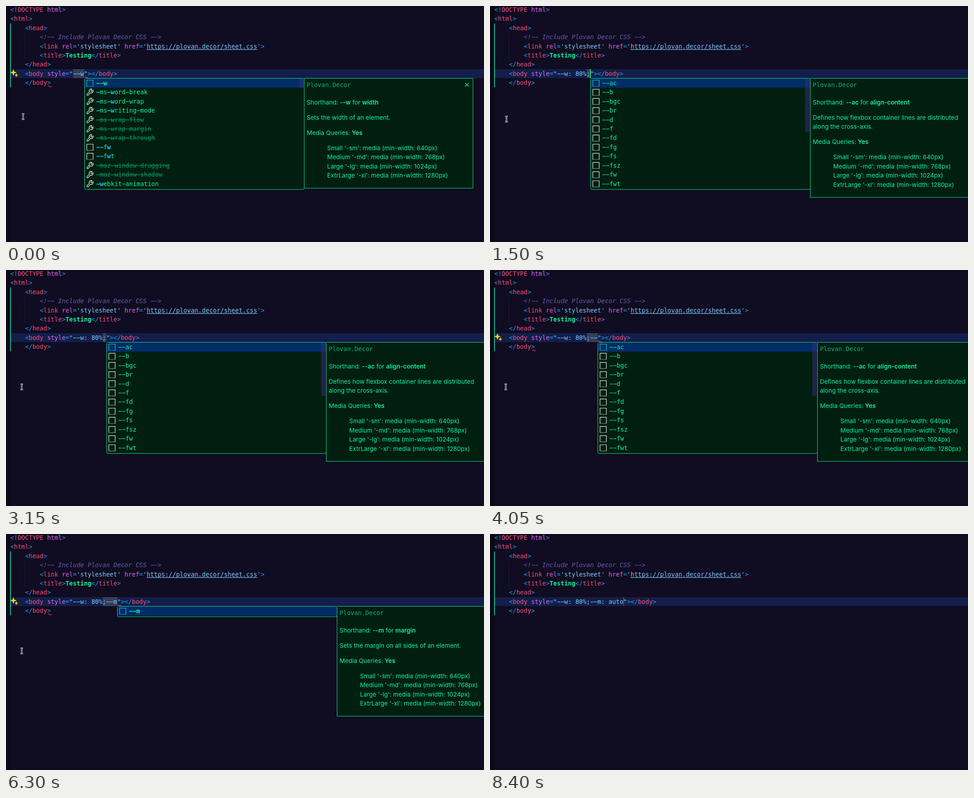
These frames come from a looping animation (1062 px wide and 527 px high, 8.55 s). An HTML page with a canvas:

```html
<!DOCTYPE html>
<html lang="en">
<head>
<meta charset="utf-8">
<title>Editor completion demo</title>
<style>
  html, body { margin: 0; width: 100%; height: 100%; overflow: hidden; background: #100c21; }
  canvas { display: block; }
</style>
</head>
<body>
<canvas id="stage" width="1062" height="527"></canvas>
<script>
const ctx = document.getElementById('stage').getContext('2d');
const LOOP = 8550, STEP = 150, CHAR = 8.188, ROW = 20.43;
const MONO = '13.6px "DejaVu Sans Mono", monospace';
const SANS = '13.5px Inter, sans-serif';
const BLUE = '#12a5ef', PINK = '#ff4f7b', VIOLET = '#e366f2', SKY = '#7fcbff',
      GREEN = '#12f59f', EDGE = '#0fe092', PANEL = '#011f11', DIM = '#0a9562', RED = '#e8365a';
const BRAND = ['Plovan', 'Decor'];

// [start, attribute value, menu, sparkle, problem marks]
const steps = [
  [0, '--w', 'width', 1, 1],
  [150, '--w: 8', '', 1, 0],
  [300, '--w: 80%', '', 1, 0],
  [450, '--w: 80%', '', 0, 0],
  [1350, '--w: 80%;', '', 0, 0],
  [1500, '--w: 80%;', 'all', 0, 0],
  [3450, '--w: 80%;-', 'all', 0, 0],
  [3600, '--w: 80%;--', 'all', 1, 1],
  [4800, '--w: 80%;--m', 'margin', 1, 1],
  [6750, '--w: 80%;--m: auto', '', 1, 0],
  [7050, '--w: 80%;--m: auto', '', 0, 0],
  [8550]
];

// [time, caret opacity]
const blink = [[0, 0], [150, 1], [600, 0], [900, .5], [1050, 1], [1950, 0], [2400, 1], [2850, 0],
  [3450, 1], [4050, 0], [4500, 1], [5250, 0], [5700, 1], [6300, 0], [6750, 1], [7200, 0],
  [7650, 1], [8400, .4]];

// [time, x, y]
const pointer = [[0, 38, 247], [300, 37.3, 249], [1050, 37, 251], [1350, 37, 251], [1650, 36.3, 254],
  [2250, 35.5, 257], [3150, 35, 261], [7800, 35, 261], [8250, 1013, 516]];

const menus = {
  width: {
    items: ['--w', '-ms-word-break', '-ms-word-wrap', '-ms-writing-mode', '!-ms-wrap-flow',
      '!-ms-wrap-margin', '!-ms-wrap-through', '--fw', '--fwt', '!-moz-window-dragging',
      '!-moz-window-shadow', '-webkit-animation'],
    thumb: 21, key: '--w', text: ['Sets the width of an element.']
  },
  all: {
    items: 'ac b bgc br d f fd fg fs fsz fw fwt'.split(' ').map(s => '--' + s),
    thumb: 119, key: '--ac', name: 'align-content',
    text: ['Defines how flexbox container lines are distributed', 'along the cross-axis.']
  },
  margin: {
    items: ['--m'], thumb: 0, key: '--m',
    text: ['Sets the margin on all sides of an element.']
  }
};
const sizes = [['Small', 'sm', 640], ['Medium', 'md', 768], ['Large', 'lg', 1024], ['ExtrLarge', 'xl', 1280]];

const wrench = new Path2D('M2.1 14.9a1.8 1.8 0 0 1 0-2.6L7.4 7.2A4.3 4.3 0 0 1 13 1.2L10.4 3.8 10.9 5.7 12.8 6.1 15.2 3.6A4.3 4.3 0 0 1 9.4 9.3L4.7 14.9a1.8 1.8 0 0 1-2.6 0Z');
const beam = new Path2D('M-3-6.2Q0-6.2 0-3.8Q0-6.2 3-6.2M0-3.8V3.8M-3 6.2Q0 6.2 0 3.8Q0 6.2 3 6.2M-1.8 1.2H1.8');

const rowY = i => 8 + ROW * i;
const at = (list, t) => list.filter(e => e[0] <= t).pop();

function rect(x, y, w, h, color) {
  ctx.fillStyle = color;
  ctx.fillRect(x, y, w, h);
}

function line(color, width, ...points) {
  ctx.strokeStyle = color;
  ctx.lineWidth = width;
  ctx.beginPath();
  points.forEach(([x, y]) => ctx.lineTo(x, y));
  ctx.stroke();
}

// Monospaced text centred on y, with the editor's long dashes
function mono(text, x, y, color, style = '') {
  ctx.font = style + ' ' + MONO;
  ctx.fillStyle = color;
  [...text.replace(/-/g, '\u2212')].forEach((c, i) => ctx.fillText(c, x + i * CHAR, y + 4.8));
  return x + text.length * CHAR;
}

function code(row, indent, ...parts) {
  let x = 9.5 + indent * 4 * CHAR;
  for (let i = 0; i < parts.length; i += 2) x = mono(parts[i + 1], x, rowY(row), parts[i]);
}

// Proportional text; odd pieces are bold
function prose(x, y, ...parts) {
  ctx.fillStyle = GREEN;
  parts.forEach((s, i) => {
    ctx.font = (i % 2 ? '600 ' : '') + SANS;
    ctx.fillText(s, x, y + 4.8);
    x += ctx.measureText(s).width;
  });
}

function squiggle(x, y) {
  line(RED, 1.2, [x, y + 1], [x + 2, y - 1], [x + 5, y + 2], [x + 8, y]);
}

function star(x, y, r) {
  ctx.fillStyle = '#ffd20a';
  ctx.beginPath();
  for (let i = 0; i < 8; i++) {
    const a = i * Math.PI / 4, d = i % 2 ? r * .38 : r;
    ctx.lineTo(x + d * Math.sin(a), y - d * Math.cos(a));
  }
  ctx.fill();
}

function boxIcon(x, y, color) {
  line(color, 1.2, [x + .5, y + 7], [x + .5, y - 6.5], [x + 14.5, y - 6.5], [x + 14.5, y + 7]);
  ctx.setLineDash([1.5, 1.2]);
  line(color, 1.2, [x, y + 7.3], [x + 15, y + 7.3]);
  ctx.setLineDash([]);
}

function item(label, x, y, selected, marked) {
  const old = label[0] === '!', name = label.replace('!', '');
  if (name.startsWith('--')) boxIcon(x + 5, y, selected ? '#1cc7d8' : '#e4eee9');
  else {
    ctx.save();
    ctx.translate(x + 4, y - 8);
    ctx.strokeStyle = '#e4eee9';
    ctx.lineWidth = 1.3;
    ctx.stroke(wrench);
    ctx.restore();
  }
  const color = old ? DIM : GREEN;
  let tx = x + 26;
  const parts = marked && name.match(/^(--?)(.*?)(-?w)(.*)$/);
  if (selected && marked) mono(name, tx, y, GREEN, 'bold');
  else if (parts && !old) parts.slice(1).forEach((s, i) => {
    tx = mono(s, tx, y, i % 2 ? color : '#14c8f5', i % 2 ? '' : 'bold');
  });
  else mono(name, tx, y, color);
  if (old) rect(x + 26, y, name.length * CHAR, 1, color);
}

function frame(x, y, w, h, r) {
  ctx.beginPath();
  ctx.roundRect(x + .5, y + .5, w, h, r);
  ctx.fillStyle = PANEL;
  ctx.fill();
  ctx.strokeStyle = EDGE;
  ctx.lineWidth = 1;
  ctx.stroke();
}

function menu(kind, x) {
  const { items, thumb, key, name = kind, text } = menus[kind];
  const marked = kind !== 'all';
  const dx = x + 488;
  frame(dx, 161, 375, 225 + ROW * text.length, 0);
  frame(x, 161, 488, items.length * ROW + 3, 3);
  rect(x + 1, 162, 487, 20.5, '#002d66');
  if (thumb) {
    rect(x + 477, 162, 10, thumb, '#1f2449');
    rect(x + 477, 162, 10, 20.5, '#1b2d72');
  }
  items.forEach((s, i) => item(s, x, 172 + i * ROW, !i, marked));

  mono(BRAND.join('.'), dx + 6, 176, '#0fb279');
  line(GREEN, 1.2, [dx + 358, 172], [dx + 366, 180]);
  line(GREEN, 1.2, [dx + 366, 172], [dx + 358, 180]);
  prose(dx + 6, 215, 'Shorthand: ', key, ' for ', name);
  text.forEach((s, i) => prose(dx + 6, 249 + i * ROW, s));
  const y = 283 + (text.length - 1) * ROW;
  prose(dx + 6, y, 'Media Queries: ', 'Yes');
  sizes.forEach(([label, tag, px], i) =>
    prose(dx + 51.5, y + 34 + i * ROW, `${label} '-${tag}': media (min-width: ${px}px)`));
}

function page(value, problems, wordX, caretX) {
  rect(0, 0, 1062, 527, '#100c21');
  rect(0, 0, 10, 527, '#0b0817');
  rect(10, 141, 1052, 20, '#131e4a');
  rect(42, 59, 1, 61, '#1c1b45');
  rect(9, 39, 2, 142.5, '#16b58a');
  if (wordX) rect(wordX, 141, caretX - wordX, 20, '#343f5c');

  code(0, 0, BLUE, '<!', PINK, 'DOCTYPE', VIOLET, ' html', BLUE, '>');
  code(1, 0, BLUE, '<', PINK, 'html', BLUE, '>');
  code(2, 1, BLUE, '<', PINK, 'head', BLUE, '>');
  mono(`<!-- Include ${BRAND.join(' ')} CSS -->`, 75, rowY(3), '#625fae', 'italic');
  const url = `https://${BRAND.join('.').toLowerCase()}/sheet.css`;
  code(4, 2, BLUE, '<', PINK, 'link', VIOLET, ' rel', BLUE, '=', SKY, "'stylesheet'",
    VIOLET, ' href', BLUE, '=', SKY, "'" + url + "'", BLUE, '>');
  rect(312.5, 96.5, url.length * CHAR, 1.3, SKY);
  code(5, 2, BLUE, '<', PINK, 'title', BLUE, '>', GREEN, '       ', BLUE, '</', PINK, 'title', BLUE, '>');
  mono('Testing', 132.3, rowY(5), GREEN, 'bold');
  code(6, 1, BLUE, '</', PINK, 'head', BLUE, '>');
  code(7, 1, BLUE, '<', PINK, 'body', VIOLET, ' style', BLUE, '=', SKY, '"' + value + '"',
    BLUE, '></', PINK, 'body', BLUE, '>');
  code(8, 1, BLUE, '</', PINK, 'body', BLUE, '>');
  if (problems) {
    squiggle(caretX + 1, 159);
    squiggle(94, 179);
  }
}

function mouse(t) {
  if (t >= 8400) return;
  const i = pointer.findLastIndex(p => p[0] <= t);
  const a = pointer[i], b = pointer[i + 1] || a;
  const k = b === a ? 0 : (t - a[0]) / (b[0] - a[0]);
  ctx.save();
  ctx.translate(a[1] + (b[1] - a[1]) * k, a[2] + (b[2] - a[2]) * k);
  for (const [color, width] of [['#e8e8ee', 2.8], ['#0a0814', .9]]) {
    ctx.strokeStyle = color;
    ctx.lineWidth = width;
    ctx.stroke(beam);
  }
  ctx.restore();
}

function draw(now) {
  const t = Math.floor(now % LOOP / STEP) * STEP;
  const [, value, kind, sparkle, problems] = at(steps, t);
  const textX = 149.2, caretX = textX + value.length * CHAR;
  const wordX = kind && (kind === 'width' ? textX : textX + 8 * CHAR);
  page(value, problems, wordX, caretX);
  if (sparkle) {
    star(16.5, 148.5, 7.5);
    star(23, 154.5, 4.5);
  }
  ctx.globalAlpha = at(blink, t)[1];
  rect(Math.round(caretX) - 1, 141, 2, 20, ctx.globalAlpha < 1 ? '#9aa39c' : '#2be575');
  ctx.globalAlpha = 1;
  if (kind) menu(kind, Math.round(caretX));
  mouse(t);
}

const start = performance.now();
(function tick() {
  draw(performance.now() - start);
  requestAnimationFrame(tick);
})();
</script>
</body>
</html>
```
